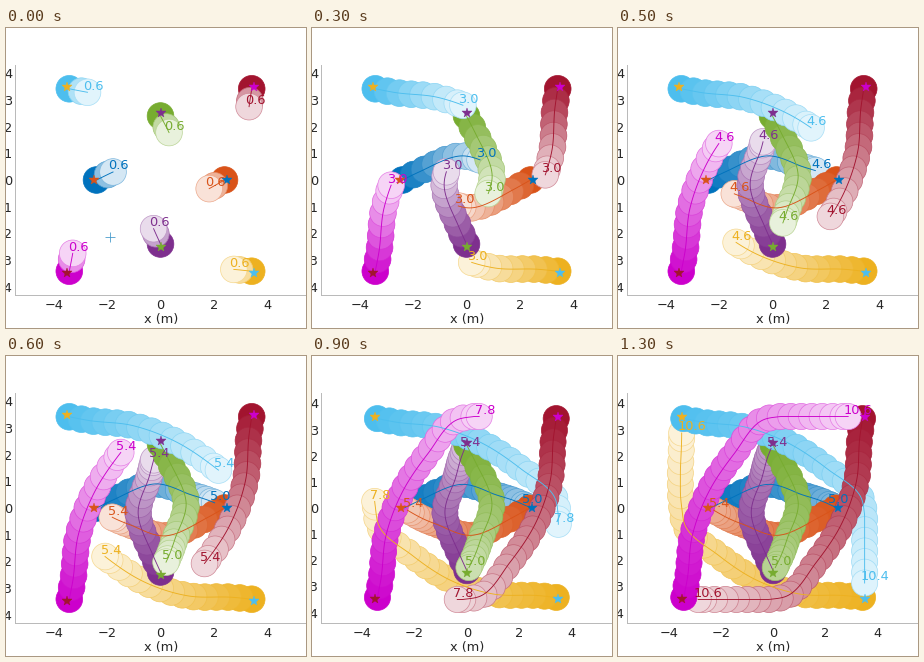
These frames come from a looping animation (300 px wide and 300 px high, 2.3 s). A matplotlib script:

```python
import numpy as np
import matplotlib.pyplot as plt
from matplotlib.animation import FuncAnimation
from matplotlib.collections import PatchCollection
from matplotlib.colors import to_rgb
from matplotlib.patches import Circle
from matplotlib.ticker import MultipleLocator

plt.rcParams["font.family"] = "DejaVu Sans"

R = 0.5          # agent radius (m)
DT = 0.4         # spacing of the trail discs (s)
STEPS = 14       # moving steps, then the picture holds
FRAMES = 23
INK = "#262626"
BOX = (9, 33, 291, 230)   # axes in pixels

# One base route per ring as (t, x, y); the others are quarter turns of it.
INNER = dict(goal=(2.5, 0), pace=5.0, route=np.array([
    (0, -2.4, 0), (0.6, -1.78, 0.31), (2.2, -0.22, 0.93),
    (3.8, 1.15, 0.52), (5.4, 2.03, 0.2), (5.8, 2.28, 0.08)]))
OUTER = dict(goal=(3.5, -3.5), pace=10.6, route=np.array([
    (0, -3.42, 3.42), (0.6, -2.75, 3.31), (2.2, -1.03, 3.15), (3.8, 0.61, 2.56),
    (5.4, 2.08, 1.59), (7, 3.39, 0.42), (7.6, 3.5, -0.2), (10.2, 3.5, -2.87)]))


def turn(p, quarters):
    """Rotate points counter-clockwise by quarter turns."""
    x, y = np.asarray(p, float).T
    for _ in range(quarters):
        x, y = -y, x
    return np.stack([x, y], axis=-1)


def spline(t, route):
    """Smooth cubic through the route at times t."""
    k, p = route[:, 0], route[:, 1:]
    m = np.gradient(p, k, axis=0)
    i = np.clip(np.searchsorted(k, t, side="right") - 1, 0, len(k) - 2)
    h = (k[i + 1] - k[i])[:, None]
    u = (t - k[i])[:, None] / h
    return ((1 + 2 * u) * (1 - u) ** 2 * p[i] + u * (1 - u) ** 2 * h * m[i]
            + u * u * (3 - 2 * u) * p[i + 1] + u * u * (u - 1) * h * m[i + 1])


def tint(color, a):
    return 1 - a * (1 - np.array(to_rgb(color)))


class Agent:
    def __init__(self, color, ring, quarters, arrive, bow):
        self.color, self.quarters, self.arrive, self.bow = color, quarters, arrive, bow
        self.route = ring["route"]
        self.rate = ring["pace"] / arrive
        self.end = self.route[-1, 0] / self.rate
        goal = turn(ring["goal"], quarters)
        self.line, = ax.plot([], [], color=color, lw=0.65, zorder=2)
        self.label = ax.text(0, 0, "", color=color, size=9.25, zorder=4)
        ax.plot(*goal, "*", color=color, ms=7.6, mew=0.3, zorder=3)

    def at(self, t):
        p = spline(np.minimum(t * self.rate, self.route[-1, 0]), self.route)
        p[:, 1] += self.bow * np.sin(np.pi * t / self.end)
        return np.clip(turn(p, self.quarters), [-3.55, -3.5], 3.5)

    def update(self, now):
        """Move line and label, return times and places of the trail."""
        end = min(now, self.end)
        ts = np.append(np.arange(0, end - 0.01, DT), end)
        spots = self.at(ts)
        self.line.set_data(*self.at(np.linspace(0, end, 120)).T)
        x, y = spots[-1]
        self.label.set_position((x - R / 3, y + R / 5))
        self.label.set_text(f"{min(now, self.arrive):.1f}")
        return ts, spots


fig = plt.figure(figsize=(3, 3), dpi=100, facecolor="white")
ax = fig.add_axes([v / 300 for v in BOX])
ax.spines[["top", "right"]].set_visible(False)
for side in ("left", "bottom"):
    ax.spines[side].set(color="#b8b8b8", linewidth=0.7)
ax.xaxis.set_major_locator(MultipleLocator(2))
ax.yaxis.set_major_locator(MultipleLocator(1))
ax.tick_params(length=0, labelsize=9.25, labelcolor=INK)
ax.tick_params(axis="x", pad=2.9)
ax.tick_params(axis="y", pad=2)
fig.text(154.75 / 300, 9 / 300, "x (m)", size=9.25, color=INK,
         ha="center", va="center")

cross, = ax.plot([], [], "+", color="#4a9ccc", ms=7.5, mew=0.6, zorder=0.5)
agents = [
    Agent("#0072BD", INNER, 0, 5.0, -0.03),
    Agent("#D95319", INNER, 2, 5.4, 0.12),
    Agent("#EDB120", OUTER, 2, 10.6, 0.23),
    Agent("#7E2F8E", INNER, 1, 5.4, -0.1),
    Agent("#77AC30", INNER, 3, 5.0, 0.03),
    Agent("#4DBEEE", OUTER, 0, 10.4, -0.1),
    Agent("#A2142F", OUTER, 3, 10.6, 0.06),
    Agent("#CC00CC", OUTER, 1, 10.6, -0.1),
]
discs = None


def fit(lo, hi):
    """Equal scale: height follows the data, width fills the axes."""
    mid = (lo + hi) / 2
    half = 1.1 * (hi[1] - lo[1]) / 2
    wide = half * BOX[2] / BOX[3]
    ax.set_xlim(mid[0] - wide, mid[0] + wide)
    ax.set_ylim(mid[1] - half, mid[1] + half)


def draw(n):
    global discs
    k = min(n, STEPS - 1)
    now = 0.6 + 0.8 * k
    shown = min(now, max(a.end for a in agents))
    patches, faces, edges, seen = [], [], [], []
    for agent in agents:
        ts, spots = agent.update(now)
        seen.append(spots)
        # the fade follows the clock, so parked agents grow darker again
        for spot, a in zip(spots, 1 - 0.83 * ts / shown):
            patches.append(Circle(spot, R))
            faces.append(tint(agent.color, a))
            edges.append(tint(agent.color, 0.4 + 0.6 * a))
    if discs is not None:
        discs.remove()
    discs = PatchCollection(patches, facecolors=faces, edgecolors=edges,
                            linewidths=0.5, zorder=1)
    ax.add_collection(discs, autolim=False)
    cross.set_data([-1.88 + 0.205 * k], [-2.14 + 0.78 * k])
    cross.set_visible(k <= 4)
    seen = np.vstack(seen)
    fit(seen.min(0) - R, seen.max(0) + R)


anim = FuncAnimation(fig, draw, frames=FRAMES, interval=100,
                     init_func=lambda: draw(0), repeat=True, blit=False)
plt.show()
```
